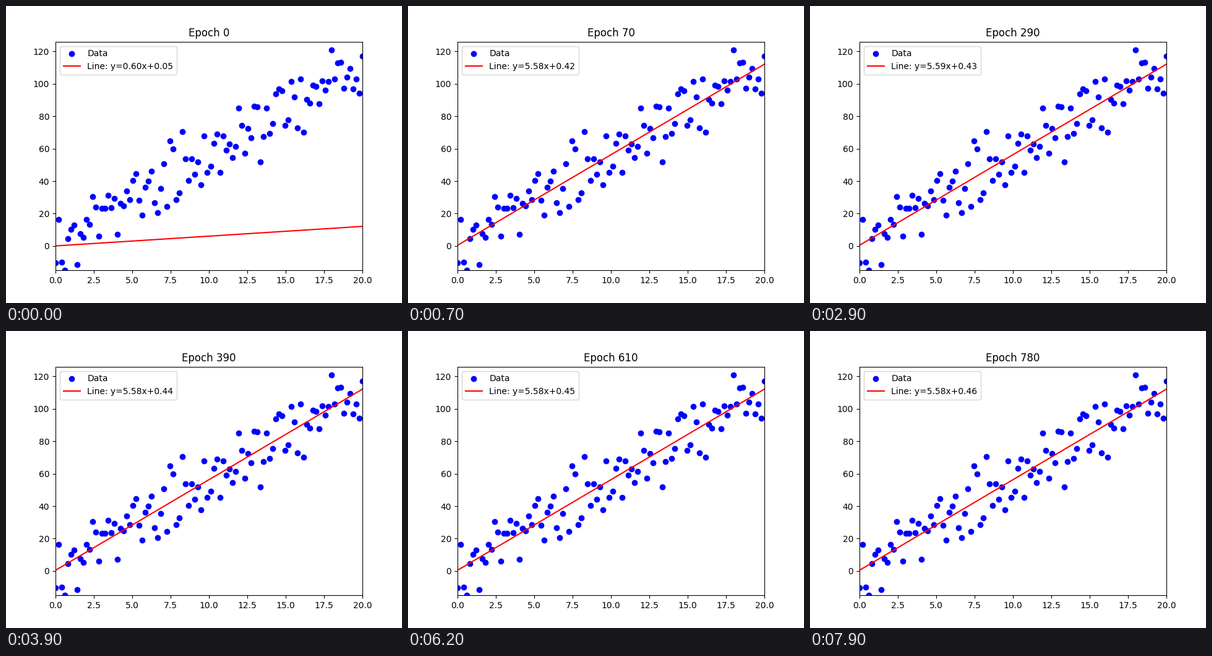
Animation, 640 px wide and 480 px high, one loop 8 s. Source, as a matplotlib script:

```python
import numpy as np
import matplotlib.pyplot as plt
from matplotlib.animation import FuncAnimation

FRAMES, INTERVAL = 80, 100
EPOCHS_PER_FRAME = 10
PAUSE = 46                    # the counter holds for one frame here
RATE = 0.0008
SLOPE, OFFSET = 5.5665, 0.682  # least-squares fit the descent heads for

x = np.linspace(0, 20, 100)
y = np.array([
    -10.4, 16.2, -10, -15, 4.4, 10.2, 12.9, -11.6, 7.5, 5.2,
    16.3, 13.2, 30.4, 24, 6, 23.2, 23.2, 31.2, 23.6, 29.3,
    7.1, 26.2, 24.8, 33.9, 28.5, 40.4, 44.5, 28.1, 19, 36.2,
    40, 46.1, 26.6, 20.5, 35.4, 50.7, 24.3, 64.8, 59.9, 28.5,
    32.7, 70.5, 53.7, 40.4, 53.7, 44.2, 51.8, 37.7, 67.8, 45.3,
    49.1, 63.3, 69, 45.3, 67.8, 59.1, 62.9, 54.5, 61.4, 85,
    74.3, 57.1, 72.4, 66.7, 86.1, 85.7, 51.8, 67.5, 85, 69.3,
    75.5, 93.8, 96.8, 95.7, 74.3, 77.8, 101.4, 91.9, 72.8, 103,
    70.1, 90.4, 88, 99.1, 98.4, 87.7, 101.8, 96.1, 101.4, 121,
    103, 112.9, 113.2, 97.2, 104.1, 109.5, 96.8, 103, 94.2, 117.1,
])


def descend(epochs):
    """Gradient descent on the mean squared error, one (w, b) per epoch."""
    w = b = 0.0
    path = []
    for _ in range(epochs):
        err = (SLOPE - w) * x + OFFSET - b
        w += RATE * np.mean(err * x)
        b += RATE * np.mean(err)
        path.append((w, b))
    return path


path = descend(FRAMES * EPOCHS_PER_FRAME)

fig, ax = plt.subplots(figsize=(6.4, 4.8), dpi=100)
ax.scatter(x, y, color="blue", label="Data")
line, = ax.plot(x, 0 * x, color="red", label="Line: y=0.00x+0.00")
ax.set_xlim(0, 20)
ax.set_ylim(-15, 126)
title = ax.set_title("Epoch 0")
label = ax.legend(loc="upper left").get_texts()[1]


def update(frame):
    epoch = EPOCHS_PER_FRAME * (frame - (frame >= PAUSE))
    w, b = path[epoch]
    line.set_ydata(w * x + b)
    label.set_text(f"Line: y={w:.2f}x+{b:.2f}")
    title.set_text(f"Epoch {epoch}")
    return line, label, title


anim = FuncAnimation(fig, update, frames=FRAMES, interval=INTERVAL,
                     init_func=lambda: update(0), repeat=True,
                     repeat_delay=0, blit=False)
plt.show()
```
